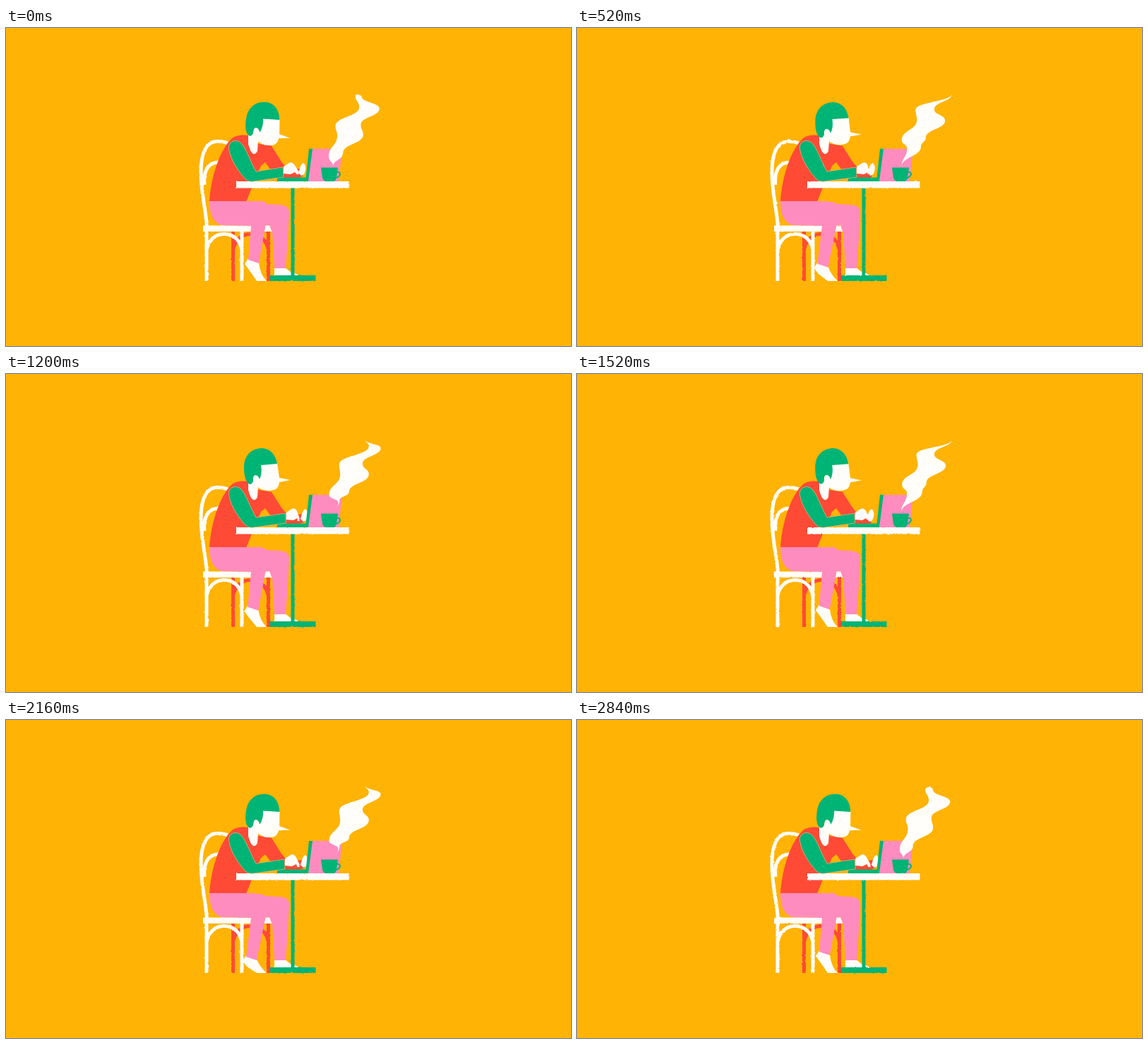
Animation, 800 px wide and 450 px high, one loop 2.88 s. Source, as an HTML page:

```html
<!DOCTYPE html>
<html lang="en">
<head>
<meta charset="utf-8">
<title>Working at the café</title>
<style>
html, body { margin: 0; width: 100%; height: 100%; overflow: hidden; background: #ffb304; }
svg { display: block; width: 100vw; height: 100vh; }
.w { fill: #fffefa; } .g { fill: #00b475; } .r { fill: #ff4a36; } .p { fill: #ff8cbe; }
.line { fill: none; stroke-width: 5; }
.lw { stroke: #fffefa; } .lr { stroke: #ff4a36; } .lg { stroke: #00b475; stroke-width: 2; }
</style>
</head>
<body>
<svg viewBox="0 0 800 450">
  <defs>
    <filter id="rough" filterUnits="userSpaceOnUse" x="260" y="80" width="290" height="290" color-interpolation-filters="sRGB">
      <feTurbulence type="fractalNoise" baseFrequency=".28" numOctaves="2"/>
      <feDisplacementMap in="SourceGraphic" scale="2.4" xChannelSelector="R" yChannelSelector="G"/>
    </filter>
    <filter id="soft" filterUnits="userSpaceOnUse" x="260" y="80" width="290" height="290" color-interpolation-filters="sRGB">
      <feTurbulence type="fractalNoise" baseFrequency=".28" numOctaves="2"/>
      <feDisplacementMap in="SourceGraphic" scale="1.3" xChannelSelector="R" yChannelSelector="G"/>
    </filter>
    <path id="legs" d="M0 288V358M50 288V358M0 314C3 299 13 291.500 25 291.500S47 299 50 314"/>
  </defs>
  <rect width="800" height="450" fill="#ffb304"/>

  <g filter="url(#rough)">
    <use href="#legs" x="321.500" class="line lr"/>
    <path class="line lw" d="M284.500 282C283 255 276 235 276 204C276 176 284 161 298 160.500Q307 160 314 163M281 222C279 203 286 190 301 190"/>
    <use href="#legs" x="284" class="line lw"/>
    <rect class="w" x="279" y="279.500" width="97" height="8.500"/>
  </g>

  <g filter="url(#soft)">
    <path class="w" d="M380 339H395L404 346Q413 347 414 351H380Z"/>
    <path class="p" d="M340 247L391 250.500Q401 252 401 261L399 300L396 340H380L377 290L373 279H340Z"/>
    <path class="w" id="shoe"/>
    <path class="r" d="M343 152Q328 150 320 156C302 173 290 212 288 246H340L348 226L361 195L367 190L375 201H400L390 189L376 167L358 164Z"/>
    <path class="p" id="leg"/>
    <path class="r" id="farArm"/>
  </g>

  <g filter="url(#rough)">
    <rect class="g" x="403.500" y="224" width="5" height="130"/>
    <rect class="g" x="374" y="350" width="64.500" height="8"/>
    <rect class="w" x="326" y="217" width="159.500" height="9.500"/>
  </g>

  <g filter="url(#soft)">
    <path class="w" d="M343 150V164Q346 176 350 178Q354 179 356 174L357 160L364 150Z"/>
    <g id="head">
      <path class="w" d="M350 136L361 126H384L387 147L403 150L387 153C386 162 382 164 374 165Q366 166 359 162L350 153Z"/>
      <path class="g" d="M345 156C338 153 337 140 337 132C337 115 348 105 363 105C376 106 382 116 384 127L361 129Q363 141 359 149Q357 143 353 143Q349 144 350 151Q349 156 345 156Z"/>
    </g>
    <path class="g" d="M384 211.500H427V217H384Z"/>
    <path class="w" id="farHand"/>
    <path class="g" id="sleeve" stroke="#ffb27a" stroke-width=".7"/>
    <path class="w" id="hand"/>
    <path class="p" d="M433 171H476L471 217H427Z"/>
    <path class="g" d="M429 171H434L428 217H424Z"/>
    <path class="w" id="steam"/>
    <path class="g" d="M446 197.500H470L468 212Q467 217 463 217H453Q449 216 448 212Z"/>
    <path class="lg" d="M468 204Q473 203 473 207Q472 211 467 212" fill="none"/>
  </g>
</svg>
<script>
const LOOP = 2880, STEP = 40, PUFF = 960;
const $ = id => document.getElementById(id);
const put = (id, d) => $(id).setAttribute('d', d);
const noises = document.querySelectorAll('feTurbulence');
const wave = (t, period) => .5 + .5 * Math.cos(2 * Math.PI * t / period);
const ease = v => {
  v = Math.max(0, Math.min(1, v));
  return v * v * (3 - 2 * v);
};

// Each turn of the steam climbs steadily and follows a parabola.
const turn = (y0, speed, x0, bend, yc) => age => {
  const y = y0 - speed * age;
  return [x0 + bend * (y - yc) ** 2, y];
};
const leftOut = turn(182, 43, 457, .0051, 182);
const leftIn = turn(152, 40, 467, .0118, 165);
const rightOut = turn(151, 37, 531, -.009, 98);
const rightIn = turn(137, 40, 506, -.0075, 115);

// Joins points with S-curves that stand upright at every turn.
function ribbon(pts) {
  return pts.slice(1).map(([x, y], i) => {
    const [px, py] = pts[i], pull = (y - py) * .5;
    return `C${px} ${py + pull} ${x} ${y - pull} ${x} ${y}`;
  }).join('');
}

function turns(phase, paths, floor) {
  const pts = [];
  for (let n = -2; n <= 2; n++) pts.push(...paths.map(path => path(phase + n)));
  return pts.filter(([, y]) => y > 95 && y < floor).sort((a, b) => a[1] - b[1]);
}

function steam(phase) {
  const tip = [514 + 17 * Math.cos(2 * Math.PI * (phase - .55)), 93];
  const base = [462 + 4 * Math.cos(2 * Math.PI * (phase - .2)), 196];
  const right = [tip, ...turns(phase, [rightOut, rightIn], 180), base];
  const left = [base, ...turns(phase, [leftOut, leftIn], 190).reverse(), tip];
  return `M${tip}${ribbon(right)}${ribbon(left)}Z`;
}

function drawLeg(lift) {
  const x = 340 + 3 * lift, y = 335 - 7 * lift;
  put('leg', `M288 245H${346 + 16 * lift}Q368 ${246 - lift} 368 ${251 - 2 * lift}V277L${x + 15} ${y + 5}` +
    `L${x} ${y}L347 280L306 279Q288 275 288 245Z`);
  put('shoe', `M${x} ${y - 2}L${x + 15} ${y + 4}Q360 350 369 358H355L${x + 1} ${y + 14}L${x - 5} ${y + 6}Z`);
}

function drawArms(cuff, far, tap) {
  put('farArm', `M384 197L392 195L400 202L${far} ${200 - 4 * tap}L${far + 3} 209L416 212H386Z`);
  put('farHand', `M${far - 1} 198Q${far + 1} 192 ${far + 4} 191Q${far + 8} 194 ${far + 7} 201` +
    `L${far + 5} 207L${far + 1} 209L${far - 3} 205Z`);
  put('sleeve', `M315.500 171C314 160 326 156 333 163C340 170 345 187 354 203L${cuff - 1} 197L${cuff} 211` +
    'L351 217Q343 218 339 214C329 203 318 187 315.500 171Z');
  const x = 413 + 4 * tap, y = 206 + 3 * tap;
  put('hand', `M${cuff} 196L${cuff + 8} 191Q${cuff + 12} 189 ${cuff + 15} 193L${x} ${y - 4}V${y}H${x - 3}` +
    `L${cuff + 16} 204L${cuff + 10} 207L${cuff} 206Z`);
}

function draw(time) {
  const step = Math.floor(time / STEP), t = step * STEP;
  noises.forEach((noise, i) => noise.setAttribute('seed', 3 + i * 7 + step % 6));

  const down = 1 - ease((t - 80) / 580) + ease((t - 1400) / 640);
  $('head').setAttribute('transform', `translate(0 ${-down}) rotate(${9 * down} 360 150)`);

  const tap = wave(t - 340, 480);
  drawLeg(wave(t, LOOP / 2));
  drawArms(397 - 4 * wave(t, LOOP / 13), 413 + 11 * tap, tap);
  put('steam', steam(t % PUFF / PUFF));
}

const start = performance.now();
function tick() {
  draw((performance.now() - start) % LOOP);
  requestAnimationFrame(tick);
}
tick();
</script>
</body>
</html>
```
